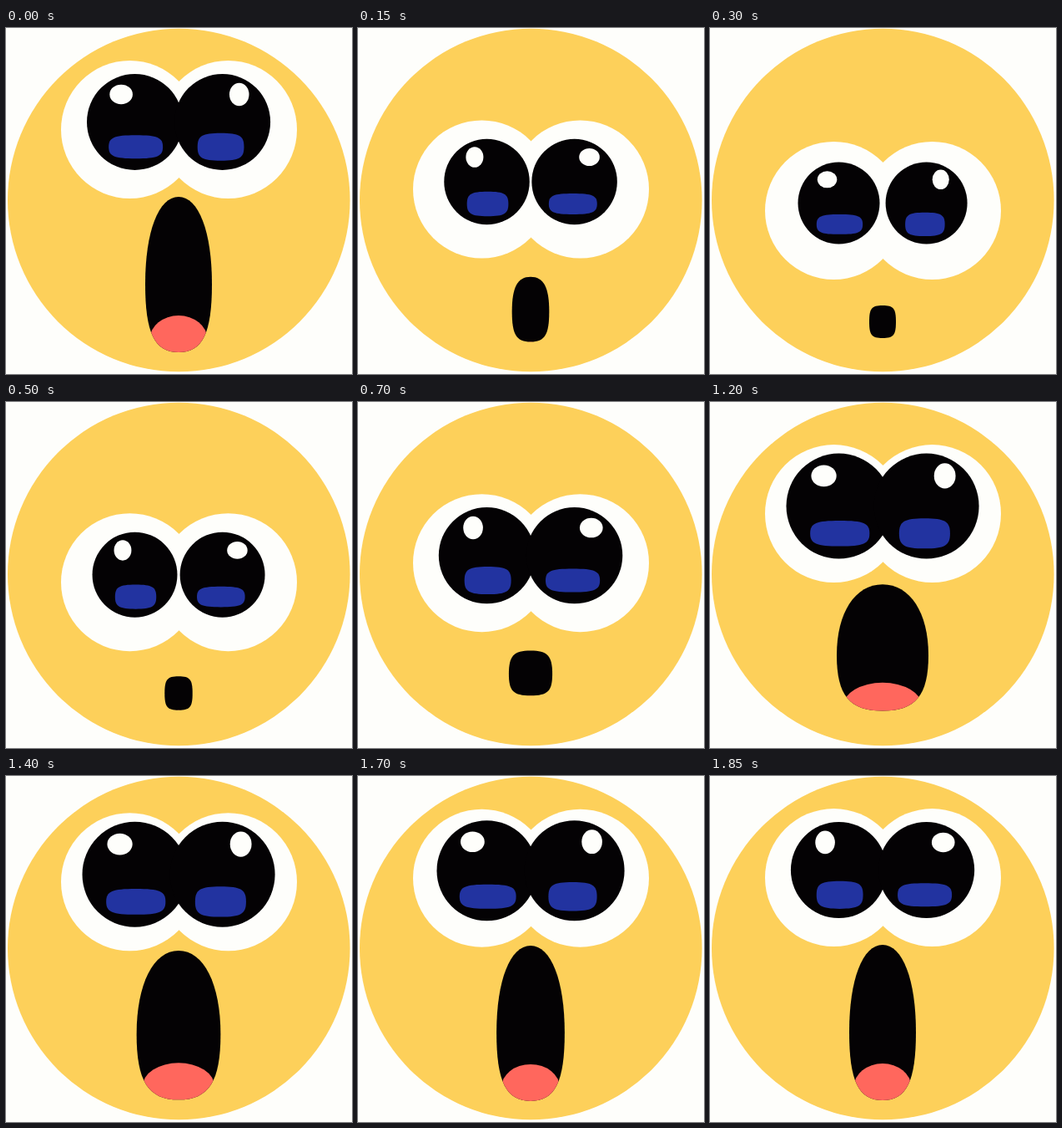
Recreate the animation shown at these times as an HTML page. Size 415 by 414 pixels, loop 1900 ms.

```html
<!DOCTYPE html>
<html lang="en">
<head>
<meta charset="utf-8">
<title>Astonished face</title>
<style>
  html, body { margin: 0; width: 100%; height: 100%; overflow: hidden; background: #fefefb; }
  svg { display: block; width: 100vw; height: 100vh; }
</style>
</head>
<body>
<svg viewBox="0 0 415 414" preserveAspectRatio="none">
  <defs><clipPath id="mouthClip"><path id="mouthClipShape"/></clipPath></defs>
  <rect width="415" height="414" fill="#fefefb"/>
  <circle cx="207.3" cy="206" r="205.3" fill="#fdd05a"/>
  <g id="eyes">
    <g fill="#fefefb"><circle cx="148.5" r="82.5"/><circle cx="266.5" r="82.5"/></g>
    <g class="pupil"><circle r="1" fill="#040204"/><path fill="#2233a0"/><ellipse fill="#fefefb"/></g>
    <g class="pupil"><circle r="1" fill="#040204"/><path fill="#2233a0"/><ellipse fill="#fefefb"/></g>
  </g>
  <path id="mouth" fill="#040204"/>
  <ellipse id="tongue" cx="207" ry="28" fill="#ff675d" clip-path="url(#mouthClip)"/>
</svg>
<script>
const LOOP = 1900, STEP = 50, SPARKLES = 7;
const $ = id => document.getElementById(id);
const pupils = document.querySelectorAll('.pupil');

const clamp = v => Math.min(1, Math.max(0, v));
const mix = (a, b, p) => a + (b - a) * p;
const set = (el, attrs) => { for (const k in attrs) el.setAttribute(k, attrs[k]); };

// Ease with handles at (x1, 0) and (x2, 1).
function ease(t, start, end, x1, x2) {
  const x = clamp((t - start) / (end - start));
  let lo = 0, hi = 1;
  for (let i = 0; i < 30; i++) {
    const s = (lo + hi) / 2, r = 1 - s;
    if (3 * r * r * s * x1 + 3 * r * s * s * x2 + s * s * s < x) lo = s; else hi = s;
  }
  return lo * lo * (3 - 2 * lo);
}

// Rounded blob, widest at height `side`; larger k gives squarer corners.
function blob(cx, top, side, bottom, w, kTop, kBottom) {
  const up = side - kTop * (side - top), down = side + kBottom * (bottom - side);
  const l = cx - w, r = cx + w;
  return `M${cx} ${top}C${cx + kTop * w} ${top} ${r} ${up} ${r} ${side}` +
    `C${r} ${down} ${cx + kBottom * w} ${bottom} ${cx} ${bottom}` +
    `C${cx - kBottom * w} ${bottom} ${l} ${down} ${l} ${side}` +
    `C${l} ${up} ${cx - kTop * w} ${top} ${cx} ${top}Z`;
}

function drawPupil(el, x, r, shineX, glowX, wide) {
  const [, glow, shine] = el.children;
  set(el, { transform: `translate(${x} -9) scale(${r})` });
  const gw = wide ? 0.565 : 0.485, gh = wide ? 0.243 : 0.287;
  set(glow, { d: blob(glowX, 0.518 - gh, 0.518, 0.518 + gh, gw, 0.8, 0.8) });
  set(shine, { cx: shineX, cy: -0.575, rx: wide ? 0.24 : 0.205, ry: wide ? 0.205 : 0.24 });
}

function render(t) {
  const shut = ease(t, 0, 300, 0.33, 0.3);
  const low = shut - ease(t, 350, 1900, 0.38, 0.08);

  const radius = 57.5 - 8.5 * shut
    + 14 * ease(t, 350, 1100, 0.33, 0.4)
    - 5.5 * ease(t, 1500, 1880, 0.4, 0.6);
  const leftWide = Math.floor(t / LOOP * SPARKLES * 2) % 2 === 0;
  set($('eyes'), { transform: `translate(0 ${mix(121.5, 218.5, low)})` });
  drawPupil(pupils[0], 154.5, radius, -0.285, 0.02, leftWide);
  drawPupil(pupils[1], 259.6, radius, 0.35, -0.035, !leftWide);

  const width = 80 - 48 * shut
    + 78 * ease(t, 420, 1200, 0.45, 0.55)
    - 30 * ease(t, 1200, 1850, 0.35, 0.4);
  const height = 186 - 147 * (shut - ease(t, 400, 1600, 0.5, 0.55));
  const top = mix(202, 332, low), bottom = top + height;
  const open = clamp((height - 39) / 70);
  const shape = blob(207, top, top + height * mix(0.5, 0.56, open), bottom,
    width / 2, mix(0.82, 0.6, open), mix(0.82, 0.72, open));
  set($('mouth'), { d: shape });
  set($('mouthClipShape'), { d: shape });
  const rise = 44 * clamp((height - 90) / 80);
  set($('tongue'), { cy: bottom - rise + 28, rx: width * 0.43 });
}

const begin = performance.now();
function tick() {
  const t = (performance.now() - begin) % LOOP;
  render(Math.floor(t / STEP) * STEP);
  requestAnimationFrame(tick);
}
tick();
</script>
</body>
</html>
```
